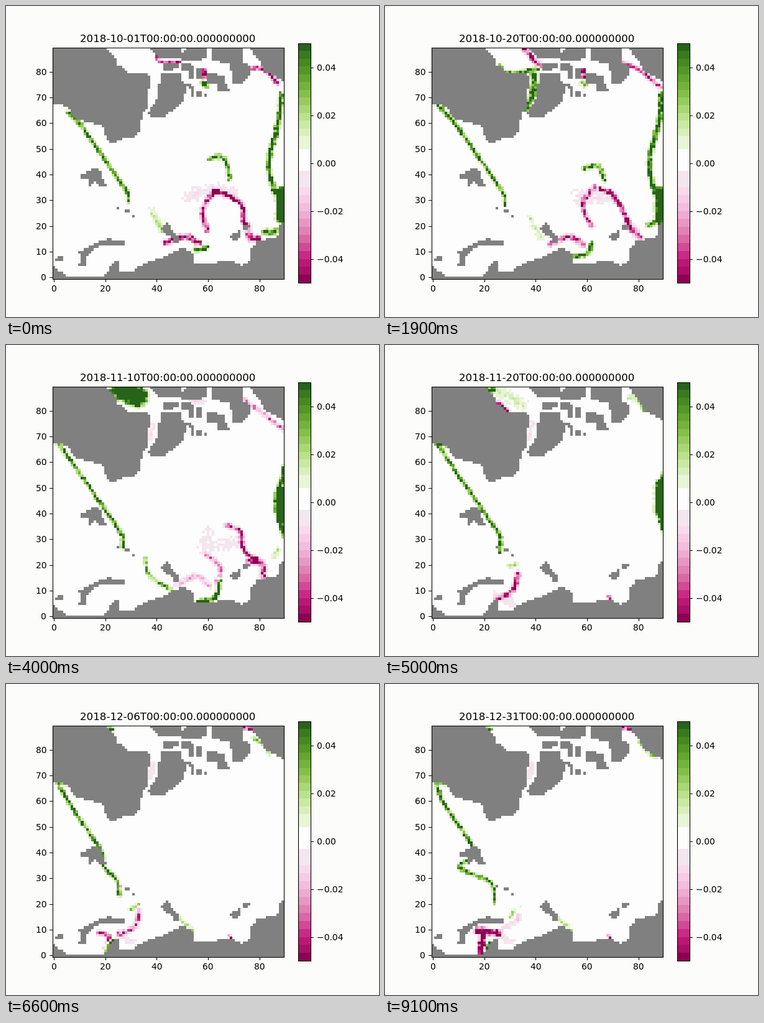
Animation of 600x500 px, one loop 9.2 s. Source, as an HTML page with a canvas:

```html
<!DOCTYPE html>
<html lang="en">
<head>
<meta charset="utf-8">
<title>Daily anomaly map</title>
<style>
html, body { margin: 0; width: 100%; height: 100%; overflow: hidden; background: #fcfcfa; }
canvas, svg { position: absolute; left: 0; top: 0; width: 600px; height: 500px; }
text { font: 13.889px "DejaVu Sans", sans-serif; fill: #000; }
#title { font-size: 16.667px; }
path { fill: none; stroke: #000; stroke-width: 1.1; stroke-linecap: square; }
#ticks { stroke-linecap: butt; }
</style>
</head>
<body>
<canvas id="map" width="600" height="500"></canvas>
<svg viewBox="0 0 600 500">
  <path d="M75.5 67.5H447.5V439.5H75.5ZM470.5 60.5H490.5V445.5H470.5Z"/>
  <path id="ticks"/>
  <text id="title" x="119" y="58"></text>
  <g id="labels"></g>
</svg>
<script>
const $ = id => document.getElementById(id);
const ctx = $('map').getContext('2d');
const N = 90, CELL = 372 / N, LEFT = 75, TOP = 67, DAYS = 92, STEP = 100;
const toX = v => LEFT + (v + .5) * CELL, toY = v => 438.5 - (v + .5) * CELL;
const clamp = v => Math.max(0, Math.min(1, v));
const mix = (a, b, f) => a + (b - a) * f;
const ease = (a, b, v) => { const f = clamp((v - a) / (b - a)); return f * f * (3 - 2 * f); };

// Axes; align is the share of the text that lies left of x
function label(x, y, text, align) {
  const el = document.createElementNS('http://www.w3.org/2000/svg', 'text');
  el.textContent = text;
  $('labels').append(el);
  el.setAttribute('x', Math.round(x - align * el.getComputedTextLength()));
  el.setAttribute('y', Math.round(y));
}
const snap = v => Math.floor(v + .5) + .5;
let ticks = '';
for (let n = 0; n <= 80; n += 10) {
  ticks += `M75 ${snap(toY(n))}h-4.9`;
  label(65.3, toY(n) + 5, n, 1);
  if (n % 20 == 0) {
    ticks += `M${snap(toX(n))} 439v4.9`;
    label(toX(n), 459, n, .5);
  }
}
for (let k = -2; k <= 2; k++) {
  const y = 252.5 - k * 77;
  ticks += `M490 ${snap(y)}h4.9`;
  label(499.7, y + 5, (k < 0 ? '\u2212' : '') + (Math.abs(k) * .02).toFixed(2), 0);
}
$('ticks').setAttribute('d', ticks);

// Colour scale: bands from green (top) to pink (bottom)
const RAMP = ['8e0152', 'c51b7d', 'de77ae', 'f1b6da', 'fde0ef', 'f7f7f7',
  'e6f5d0', 'b8e186', '7fbc41', '4d9221', '276419']
  .map(h => [0, 2, 4].map(i => parseInt(h.slice(i, i + 2), 16)));
function ramp(t) {
  const i = Math.min(9, Math.floor(t * 10)), f = t * 10 - i;
  return `rgb(${RAMP[i].map((c, k) => Math.round(mix(c, RAMP[i + 1][k], f)))})`;
}
const edges = [];
for (let k = 0; k <= 12; k++) edges.push(60 + k * 149 / 12);
edges.push(230, 265);
for (let k = 0; k <= 12; k++) edges.push(291 + k * 154 / 12);
const bands = edges.slice(1).map((e, i) => ramp((445 - (e + edges[i]) / 2) / 385));
bands[0] = '#276419';
bands[13] = '#fdfdfd';
bands[14] = '#f4e6ee';
bands[bands.length - 1] = '#8e0152';
function colour(v) {
  const y = 252.5 - v * 3.85;
  let i = 0;
  while (i < bands.length - 1 && y >= edges[i + 1]) i++;
  return bands[i];
}

// Land outlines, sampled at cell centres
const land = new Uint8Array(N * N);
function coast(points) {
  const shape = new Path2D(`M${points}Z`);
  for (let j = 0; j < N; j++) for (let i = 0; i < N; i++)
    if (ctx.isPointInPath(shape, LEFT + (i + .5) * CELL, TOP + (j + .5) * CELL)) land[j * N + i] = 1;
}
// west and north
coast(`75 67 161 67 176 82 178 92 199 110 228 110 234 118 226 145 228 162 219 176 214 203 204 211
  187 213 172 222 162 213 154 192 133 187 108 180 104 166 88 158 75 158`);
coast('250 108 283 108 283 122 290 128 286 152 272 165 252 179 232 179 229 170 245 148 246 128');
coast('232 67 283 67 281 83 245 83');
coast('292 67 324 67 324 83 305 88 282 88 282 79');
coast('253 92 278 92 278 97 268 104 253 104');
coast('282 91 298 91 302 103 302 117 295 117 294 104 282 104');
coast('333 67 379 67 381 88 393 99 393 109 378 124 366 124 360 92 333 88');
coast('395 67 447 67 447 121 415 104 407 88 396 76');
coast('324 108 349 112 360 137 341 139 339 125 325 123');
coast('286 124 299 124 303 146 299 146 298 132 286 130');
// islands
coast('121 271 138 262 150 262 161 290 150 290 144 283 130 292 134 279 121 277');
coast('117 394 137 386 162 374 191 377 191 385 150 386 128 402 128 417 117 417 121 404');
coast('79 406 84 402 92 402 92 410 79 410');
coast('249 356 257 348 261 348 266 361 278 373 278 382 270 382 266 369 257 370');
coast('362 368 378 360 378 369 370 377 362 374');
coast('381 352 393 352 393 357 381 361');
const islet = (x, y, w, h) => coast(`${x} ${y}h${w}v${h}h${-w}`);
islet(307, 100, 8, 16);
islet(307, 138, 8, 8);
islet(319, 141, 5, 5);
islet(179, 323, 4, 4);
islet(191, 327, 8, 5);
islet(203, 335, 5, 5);
// south
coast(`75 415 84 424 100 435 158 435 174 411 183 411 183 425 208 427 212 419 253 403 283 389 300 395
  304 416 324 415 358 409 380 417 393 410 393 393 404 377 435 373 440 354 447 348 447 439 75 439`);

// Smooth line through [x, y] points
function curve(p) {
  const out = [p[0]], at = i => p[Math.max(0, Math.min(p.length - 1, i))];
  for (let i = 0; i < p.length - 1; i++) for (let k = 1; k <= 5; k++) {
    const u = k / 5;
    out.push([0, 1].map(c => {
      const [a, b, d, e] = [at(i - 1)[c], at(i)[c], at(i + 1)[c], at(i + 2)[c]];
      return b + u * ((d - a) / 2 + u * (a - 2.5 * b + 2 * d - e / 2 + u * (1.5 * (b - d) + (e - a) / 2)));
    }));
  }
  return out;
}

// Bands that drift from one line to another between two days; strength in thousandths
const sweeps = [];
const pairs = s => s.split(',').map(p => p.trim().split(' ').map(Number));
function sweep(start, end, amp, width, from, to = from, last = amp) {
  sweeps.push({ start, end, amp, last, width, from: pairs(from), to: pairs(to) });
}
const PAST = -4, ON = 98;
// central arch: legs, halo, cap
sweep(PAST, 28, -75, 6, '322 362, 316 330, 335 299', '336 350, 318 315, 338 288', -35);
sweep(24, 44, -55, 6, '340 380, 344 356, 322 338');
sweep(PAST, 46, -90, 5.5, '335 300, 352 303, 379 320, 380 350', '356 288, 380 300, 382 330, 408 345', -55);
sweep(PAST, 45, -10, 17, '292 308, 328 292, 360 298', '330 300, 320 330, 375 318');
sweep(PAST, 27, 60, 6, '328 242, 352 242, 362 278', '316 270, 338 262, 350 280');
// southern coast
sweep(PAST, 46, -75, 7, '255 380, 288 370, 308 380', '278 386, 308 372, 330 388', -20);
sweep(PAST, 46, 95, 5, '304 389, 312 390, 322 388', '308 416, 340 408, 346 376');
sweep(PAST, 46, -65, 8, '388 354, 392 376, 404 374', '392 346, 414 348, 416 372');
sweep(PAST, 44, 75, 7, '415 366, 434 366', '434 336, 438 326', 30);
sweep(PAST, 24, 22, 8, '234 326, 252 360', '234 345, 250 375');
sweep(22, 46, 45, 5, '225 342, 230 370, 268 395');
sweep(44, ON, 30, 6, '200 352, 212 352', '202 376, 215 360');
sweep(44, ON, -55, 4, '360 405, 364 411');
sweep(58, ON, 25, 5, '280 378, 300 396');
// south-western bay
sweep(42, ON, -70, 6, '177 411, 204 398, 214 370', '190 390, 214 378, 213 355', -8);
sweep(62, 82, -50, 6, '150 400, 166 406, 158 430');
sweep(82, ON, -120, 7, '148 396, 182 400');
sweep(82, ON, -130, 7, '158 402, 154 434');
sweep(60, ON, 95, 5, '158 430, 166 416, 176 411', '163 430, 165 424, 167 418');
sweep(46, ON, -10, 11, '180 402, 205 416');
// northern passages
sweep(PAST, 6, -55, 4, '242 82, 252 90, 280 90');
sweep(8, 36, -75, 6, '228 68, 248 96', '216 68, 252 98');
sweep(44, 56, -65, 5, '182 92, 198 108');
sweep(12, 26, 85, 5, '184 97, 200 109, 246 100');
sweep(10, 26, 85, 8, '240 110, 240 132, 228 166');
sweep(24, 46, 200, 20, '195 76, 208 88, 230 98', '180 70, 190 72, 205 78');
sweep(42, 64, 16, 15, '182 74, 222 96');
sweep(42, ON, 85, 6, '162 71, 176 73', '162 71, 167 73');
sweep(26, ON, -11, 7, '238 126, 232 150');
sweep(PAST, 28, 95, 8, '317 122, 322 126', '319 124, 320 128', 20);
sweep(PAST, 26, -90, 6, '319 104, 320 114');
sweep(22, 42, -45, 5, '300 90, 318 91');
sweep(PAST, 50, -65, 5, '396 101, 416 102, 437 124', '372 78, 412 112, 450 140', -35);
sweep(44, ON, 32, 6, '390 84, 406 86, 414 104', '412 92, 422 108, 440 120');
sweep(52, ON, -80, 5, '384 70, 394 73');
sweep(38, ON, 50, 4, '78 156, 102 164');

// The long western and eastern edges, row by row in map units
function westEdge(s) {
  const pts = [], late = ease(.55, 1, s);
  for (let y = 67 - 3 * (1 - clamp(s * 5)); y > 29 - 9 * s; y -= 1.5) {
    const x = 1 + .69 * (68 - y) + (3.5 - 6.5 * s) * clamp((68 - y) / 8);
    const notch = 11 * late * Math.exp(-(((y - 34) / 4) ** 2));
    pts.push([toX(Math.min(x, 29 - 5 * s) - notch), toY(y)]);
  }
  return pts;
}
function eastEdge(s) {
  const pts = [], out = 4 * ease(.1, .6, s) + 12 * ease(.55, .7, s);
  for (let y = mix(71, 57, clamp((s - .3) * 4)); y > 31; y -= 2)
    pts.push([toX(88.3 - 4.6 * Math.exp(-(((y - 44) / 13) ** 2)) + out), toY(y)]);
  return pts;
}
function eastPool(s) {
  const y = 28 + 13 * ease(.21, .34, s) + 5 * ease(.34, .54, s), x = 88.5 + 8 * ease(.55, .68, s);
  return [[toX(x), toY(y + 5)], [toX(x), toY(y - 5)]];
}

function random(n) {
  const h = Math.sin(n * 12.9898) * 43758.5453;
  return h - Math.floor(h);
}
const grain = (n, day) => .8 + .4 * Math.sin(random(n) * 6.283 + day * .5);
function gap(x, y, a, b) {
  const dx = b[0] - a[0], dy = b[1] - a[1], q = dx * dx + dy * dy;
  const f = q ? clamp(((x - a[0]) * dx + (y - a[1]) * dy) / q) : 0;
  return Math.hypot(x - a[0] - dx * f, y - a[1] - dy * f);
}
function stroke(out, day, pts, amp, w) {
  const cell = (v, o) => Math.max(0, Math.min(N - 1, Math.floor((v - o) / CELL)));
  const xs = pts.map(p => p[0]), ys = pts.map(p => p[1]);
  const i1 = cell(Math.max(...xs) + w, LEFT), j1 = cell(Math.max(...ys) + w, TOP);
  for (let j = cell(Math.min(...ys) - w, TOP); j <= j1; j++)
    for (let i = cell(Math.min(...xs) - w, LEFT); i <= i1; i++) {
      const n = j * N + i, x = LEFT + (i + .5) * CELL, y = TOP + (j + .5) * CELL;
      if (land[n]) continue;
      let d = w;
      for (let s = 1; s < pts.length; s++) d = Math.min(d, gap(x, y, pts[s - 1], pts[s]));
      out[n] += amp * (1 - d / w) * grain(n, day);
    }
}
function field(day) {
  const out = new Float32Array(N * N), s = day / (DAYS - 1);
  stroke(out, day, westEdge(s), 75, 4.5);
  stroke(out, day, eastEdge(s), 100, 5.5);
  stroke(out, day, eastPool(s), 190, 11);
  for (const b of sweeps) {
    if (day <= b.start || day >= b.end) continue;
    const f = (day - b.start) / (b.end - b.start);
    const fade = Math.min(1, (day - b.start) / 4, (b.end - day) / 6);
    const pts = b.from.map((p, i) => p.map((v, c) => mix(v, b.to[i][c], f)));
    stroke(out, day, curve(pts), mix(b.amp, b.last, f) * fade, b.width);
  }
  return out;
}

function draw(day) {
  ctx.clearRect(0, 0, 600, 500);
  const values = field(day), edge = (i, o) => Math.round(o + i * CELL);
  for (let j = 0; j < N; j++) for (let i = 0; i < N; i++) {
    const n = j * N + i, x = edge(i, LEFT), y = edge(j, TOP);
    ctx.fillStyle = land[n] ? '#808080' : colour(values[n]);
    ctx.fillRect(x, y, edge(i + 1, LEFT) - x, edge(j + 1, TOP) - y);
  }
  bands.forEach((c, i) => {
    const y = Math.round(edges[i]);
    ctx.fillStyle = c;
    ctx.fillRect(470, y, 20, Math.round(edges[i + 1]) - y);
  });
  $('title').textContent = new Date(Date.UTC(2018, 9, 1 + day)).toISOString().slice(0, 10) + 'T00:00:00.000000000';
}

let shown = -1, start;
function tick(now) {
  start ??= now;
  const day = Math.floor(Math.max(0, now - start) / STEP) % DAYS;
  if (day !== shown) draw(shown = day);
  requestAnimationFrame(tick);
}
draw(shown = 0);
requestAnimationFrame(tick);
</script>
</body>
</html>
```
